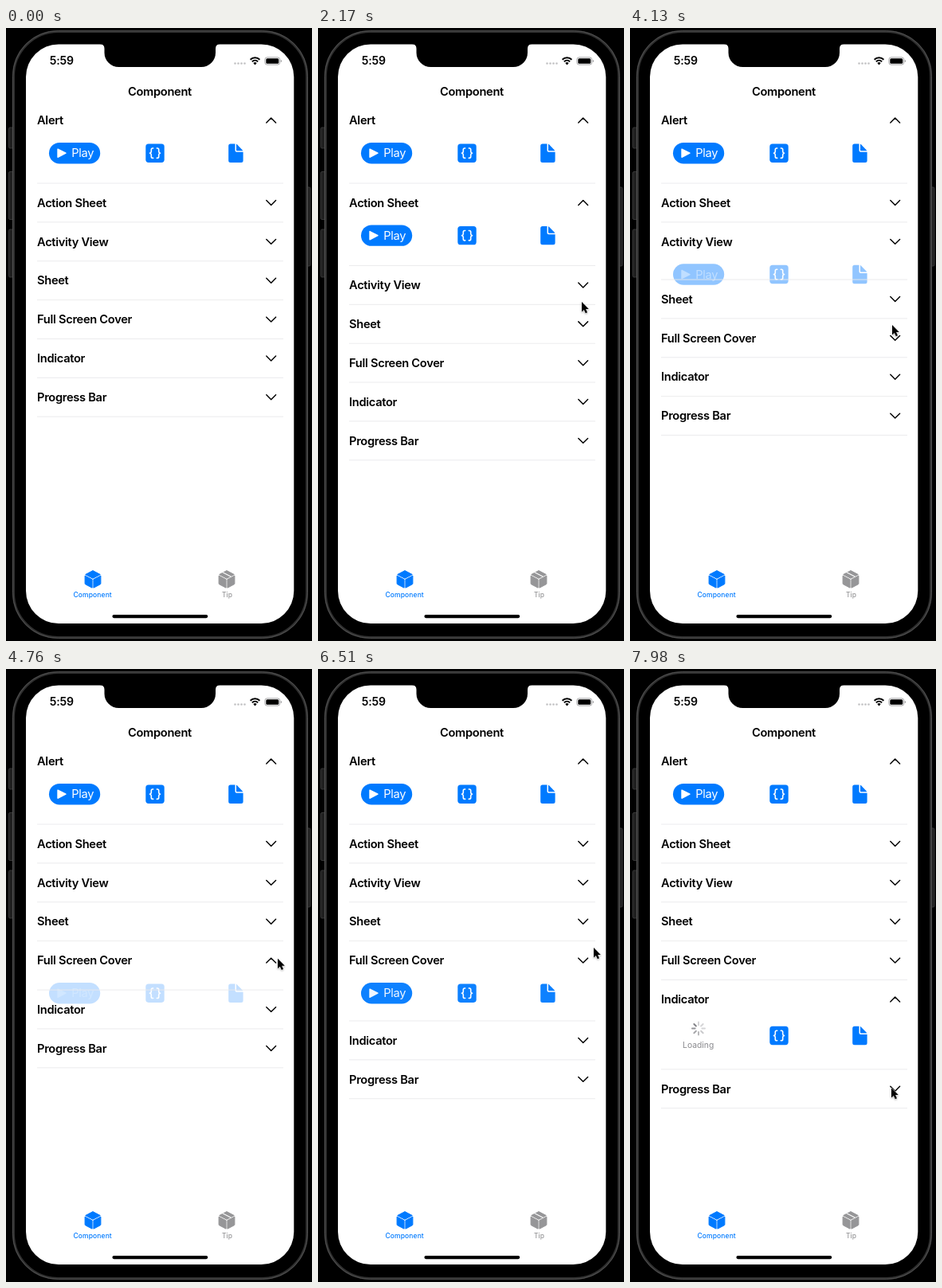
An HTML page for the animation above (8000 ms loop, 384 px wide and 770 px high).

```html
<!DOCTYPE html>
<html lang="en">
<head>
<meta charset="utf-8">
<title>Component list</title>
<style>
  html, body { margin: 0; width: 100%; height: 100%; overflow: hidden; background: #000; }
  svg { display: block; width: 384px; height: 770px; font-family: Inter, "Open Sans", sans-serif; }
  .label { font-size: 14.65px; font-weight: 600; letter-spacing: -.3px; }
  .clock { font-size: 14.1px; font-weight: 600; letter-spacing: -.2px; }
  .play { font-size: 14.65px; letter-spacing: -.3px; }
  .loading { font-size: 10.35px; fill: #8a8a8e; text-anchor: middle; }
  .tab { font-size: 8.5px; font-weight: 500; letter-spacing: .1px; text-anchor: middle; }
  .mid { text-anchor: middle; }
  .chevron { fill: none; stroke: #000; stroke-width: 1.45; stroke-linecap: round; stroke-linejoin: round; }
  .rule { stroke: #e9e9eb; stroke-width: .9; }
  .line { fill: none; stroke-linecap: round; stroke-linejoin: round; }
</style>
</head>
<body>
<svg viewBox="0 0 384 770">
  <defs>
    <g id="code">
      <rect x="175.3" y="-11.7" width="23.4" height="23.4" rx="3.6" fill="#007aff"/>
      <path id="brace" class="line" stroke="#fff" stroke-width="1.6"
        d="M184.7 -6.2 h-.7 q-1.7 0 -1.7 1.8 v2.3 q0 1.7 -1.8 2.1 q1.8 .4 1.8 2.1 v2.3 q0 1.8 1.7 1.8 h.7"/>
      <use href="#brace" transform="matrix(-1 0 0 1 374 0)"/>
    </g>
    <g id="doc" fill="#007aff">
      <path d="M281.7 -11.7 h5.8 v8.3 q0 1.9 1.9 1.9 h8.2 v10.7 q0 2.5 -2.5 2.5 h-13.4 q-2.5 0 -2.5 -2.5 v-18.4 q0 -2.5 2.5 -2.5z"/>
      <path d="M289 -11.4 q.6 .2 1.2 .8 l6.2 6.3 q.7 .7 .9 1.3 h-7.5 q-.8 0 -.8 -.8z"/>
    </g>
    <rect id="pill" x="54" y="-13.2" width="64.2" height="26.4" rx="13.2" fill="#007aff"/>
    <g id="play" fill="#fff">
      <path d="M65 -5.1 L75 0 L65 5.1z" stroke="#fff" stroke-width="1.4" stroke-linejoin="round"/>
      <text class="play" x="82.3" y="5.2">Play</text>
    </g>
    <g id="cube" stroke-width="1" stroke-linejoin="round">
      <path d="M0 -10.8 L9.3 -5.9 L0 -1.1 L-9.3 -5.9z"/>
      <path d="M-9.9 -4.4 L-.9 .3 V10.8 L-9.3 6.4 Q-9.9 6 -9.9 5.3z"/>
      <path d="M9.9 -4.4 L.9 .3 V10.8 L9.3 6.4 Q9.9 6 9.9 5.3z"/>
    </g>
  </defs>

  <rect width="384" height="770"/>
  <g fill="#202020" stroke="#414141" stroke-width=".8">
    <rect x="3.5" y="125" width="6" height="26" rx="1.5"/>
    <rect x="3.5" y="180.5" width="6" height="60" rx="1.5"/>
    <rect x="3.5" y="253" width="6" height="60" rx="1.5"/>
    <rect x="376" y="200" width="6" height="99" rx="1.5"/>
  </g>
  <rect x="9.5" y="4.5" width="368" height="761" rx="56" fill="#000" stroke="#303030" stroke-width="3"/>
  <rect x="8.5" y="3.5" width="370" height="763" rx="57" fill="none" stroke="#555" stroke-width=".9"/>
  <rect x="25" y="20.4" width="336.3" height="727.7" rx="41" fill="#fff"/>
  <path d="M118 20 q5.5 .5 5.5 6 V31 a18 18 0 0 0 18 18 H245 a18 18 0 0 0 18 -18 V26 q0 -5.5 5.5 -6z"/>

  <text class="clock" x="54.8" y="46.2">5:59</text>
  <g fill="#c2c2c4">
    <circle cx="287.5" cy="44.5" r="1.3"/><circle cx="291.5" cy="44.5" r="1.3"/>
    <circle cx="295.5" cy="44.5" r="1.3"/><circle cx="299.5" cy="44.5" r="1.3"/>
  </g>
  <g class="line" stroke="#000" stroke-width="2" style="stroke-linecap:butt">
    <path d="M306.6 39.7 a8.4 8.4 0 0 1 11.8 0"/>
    <path d="M308.9 42.2 a5.1 5.1 0 0 1 7.2 0"/>
  </g>
  <path d="M312.5 46.5 l-2.2 -2.4 a3.2 3.2 0 0 1 4.4 0z"/>
  <rect x="324.9" y="36.9" width="18.8" height="9.2" rx="2.7" fill="none" stroke="#9b9b9d" stroke-width=".9"/>
  <rect x="326.3" y="38.3" width="16" height="6.4" rx="1.5"/>
  <path d="M344.8 40 q1.3 .4 1.3 1.5 t-1.3 1.5z" fill="#9b9b9d"/>

  <text class="label mid" x="193" y="84.7">Component</text>
  <g id="list"></g>

  <use href="#cube" x="109" y="692.4" fill="#007aff" stroke="#007aff"/>
  <text class="tab" x="108.7" y="715.2" fill="#007aff">Component</text>
  <use href="#cube" x="277" y="692.4" fill="#969698" stroke="#969698"/>
  <path class="line" d="M271.9 683.8 L282 689.1" stroke="#fff" stroke-width="1.1"/>
  <text class="tab" x="277.5" y="715.2" fill="#969698">Tip</text>
  <rect x="133.4" y="736.9" width="119.9" height="4.3" rx="2.15"/>
  <path id="cursor" d="M0 0 V12.4 L2.8 9.9 L4.8 14.2 L7 13.2 L5.1 9 H8.8z"
    stroke="#fff" stroke-width="1" stroke-linejoin="round"
    style="paint-order:stroke; filter:drop-shadow(0 1px 1px rgba(0,0,0,.3))"/>
</svg>

<script>
const LOOP = 8000, STEP = 70, FADE = 420;
const FIRST_Y = 116, HALF = 24.43, EXTRA = 54.6, LOADING_EXTRA = 63.5;

// open and close: when each row starts to unfold and fold
const rows = [
  { name: 'Alert', open: -FADE },
  { name: 'Action Sheet', open: 1330, close: 2990 },
  { name: 'Activity View', open: 2450, close: 3902 },
  { name: 'Sheet' },
  { name: 'Full Screen Cover', open: 4620, close: 6440 },
  { name: 'Indicator', open: 7210, loading: true },
  { name: 'Progress Bar' }
];

// time, x, y of the pointer tip
const pointerPath = [
  [70, 100, 694], [560, 309, 357], [630, 309, 357], [1260, 339, 212],
  [1750, 339, 212], [2170, 331, 344], [2240, 317, 338], [2380, 347, 308],
  [2520, 347, 308], [2940, 345, 202], [3010, 345, 202], [3150, 338, 238],
  [3850, 337, 250], [3920, 337, 250], [4130, 329, 373], [4340, 310, 378],
  [4480, 310, 378], [4550, 341, 352], [4690, 341, 352], [5040, 341, 466],
  [5180, 341, 466], [5460, 335, 502], [5670, 341, 462], [5810, 341, 462],
  [6090, 316, 415], [6370, 346, 350], [6860, 346, 350], [7070, 330, 424],
  [7140, 332, 424], [7630, 332, 424], [7980, 328, 526]
];

const clamp = v => Math.min(1, Math.max(0, v));

// cubic-bezier(.42, 0, .58, 1)
function ease(x) {
  if (x <= 0 || x >= 1) return clamp(x);
  let lo = 0, hi = 1, s = .5;
  for (let i = 0; i < 20; i++) {
    s = (lo + hi) / 2;
    const bx = 3 * s * (1 - s) ** 2 * .42 + 3 * s * s * (1 - s) * .58 + s ** 3;
    if (bx < x) lo = s; else hi = s;
  }
  return s * s * (3 - 2 * s);
}

function add(parent, tag, attrs = {}, text = '') {
  const el = document.createElementNS('http://www.w3.org/2000/svg', tag);
  for (const key in attrs) el.setAttribute(key, attrs[key]);
  el.textContent = text;
  return parent.appendChild(el);
}

const list = document.getElementById('list');
const cursor = document.getElementById('cursor');
const spokes = [];

for (const row of rows) {
  row.el = add(list, 'g');
  row.body = add(row.el, 'g');
  const y = row.loading ? 45.6 : 41.2;
  if (row.loading) {
    for (let i = 0; i < 8; i++) {
      spokes.push(add(row.body, 'line', {
        x1: 0, x2: 0, y1: -4.4, y2: -8, stroke: '#77777c', 'stroke-width': 2,
        'stroke-linecap': 'round', transform: `translate(86 36.7) rotate(${i * 45})`
      }));
    }
    add(row.body, 'text', { class: 'loading', x: 85.7, y: 61 }, 'Loading');
  } else {
    add(row.body, 'use', { href: '#pill', y });
    row.caption = add(row.body, 'use', { href: '#play', y });
  }
  add(row.body, 'use', { href: '#code', y });
  add(row.body, 'use', { href: '#doc', y });
  add(row.el, 'text', { class: 'label', x: 39, y: 5.3 }, row.name);
  row.chevron = add(row.el, 'path', { class: 'chevron' });
  row.rule = add(row.el, 'line', { class: 'rule', x1: 39, x2: 348 });
}

function openness(row, t) {
  if (row.open === undefined) return 0;
  const opened = ease((t - row.open) / FADE);
  const closed = row.close ? ease((t - row.close) / FADE) : 0;
  return opened - closed;
}

function placeCursor(t) {
  cursor.style.display = t < pointerPath[0][0] ? 'none' : '';
  const next = pointerPath.findIndex(p => p[0] >= t);
  const [t1, x1, y1] = pointerPath[next];
  const [t0, x0, y0] = pointerPath[Math.max(0, next - 1)];
  const k = t1 > t0 ? (t - t0) / (t1 - t0) : 1;
  const s = k * k * (3 - 2 * k);
  cursor.setAttribute('transform', `translate(${x0 + (x1 - x0) * s} ${y0 + (y1 - y0) * s})`);
}

function draw(now) {
  const t = Math.floor((now % LOOP) / STEP) * STEP;
  let y = FIRST_Y;
  for (const row of rows) {
    const k = openness(row, t);
    const foot = HALF + k * (row.loading ? LOADING_EXTRA : EXTRA);
    const isOpen = t > row.open && !(t > row.close);
    row.el.setAttribute('transform', `translate(0 ${y})`);
    row.body.setAttribute('opacity', k);
    // the caption fades on top of the fading pill
    row.caption?.setAttribute('opacity', k);
    row.chevron.setAttribute('d', isOpen ? 'M326.8 3 l5.9 -5.9 l5.9 5.9' : 'M326.8 -2.9 l5.9 5.9 l5.9 -5.9');
    row.rule.setAttribute('y1', foot);
    row.rule.setAttribute('y2', foot);
    y += foot + HALF;
  }
  const head = Math.floor(t / 125) % 8;
  spokes.forEach((spoke, i) => {
    const age = (head - i + 8) % 8;
    spoke.setAttribute('opacity', Math.max(.3, .9 - age * .13));
  });
  placeCursor(t);
}

const start = performance.now();
function tick() {
  draw(performance.now() - start);
  requestAnimationFrame(tick);
}
tick();
</script>
</body>
</html>
```
